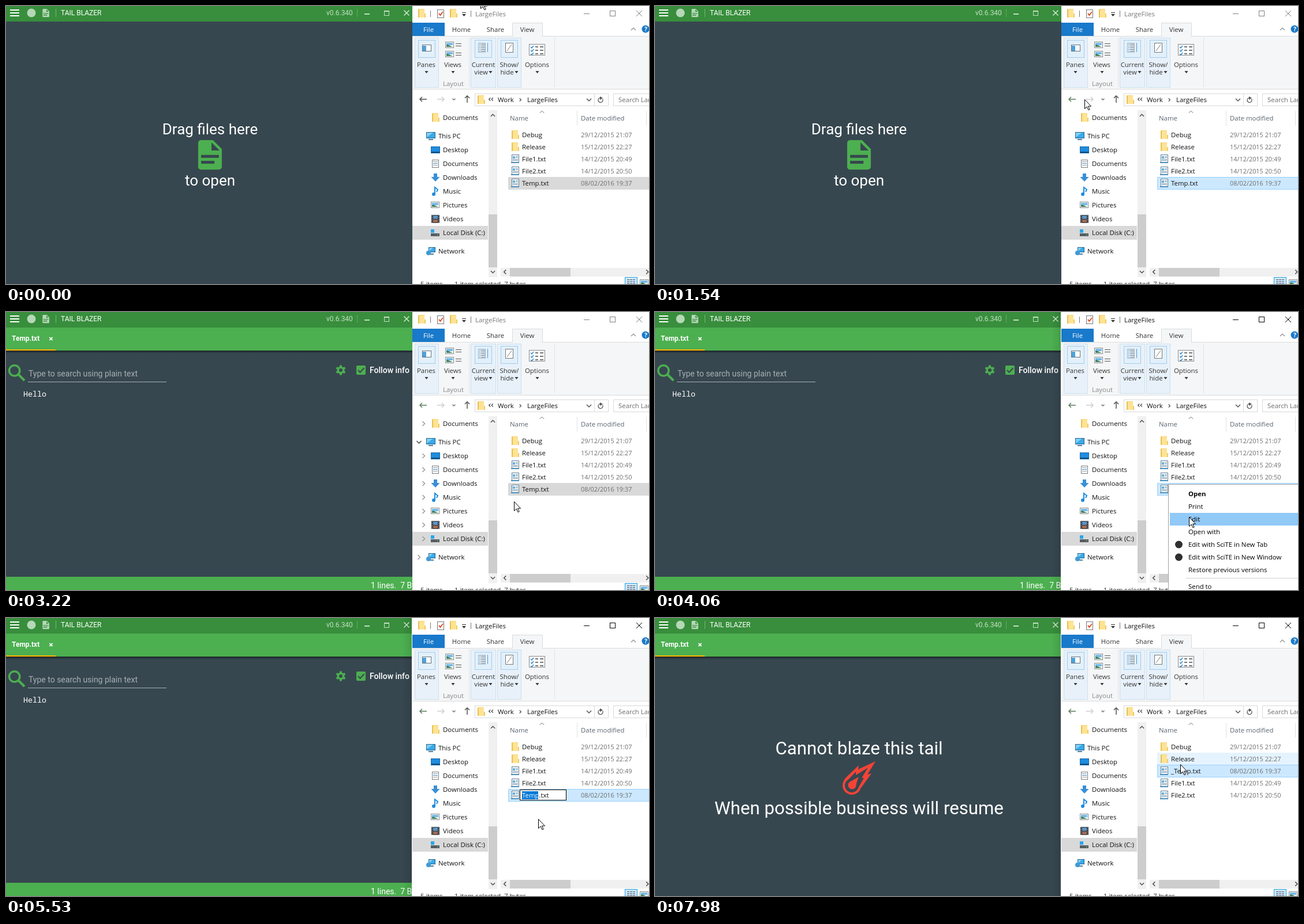
These frames come from a looping animation (1114 by 483 pixels, 8000 ms). An HTML page with a canvas:

```html
<!DOCTYPE html>
<html lang="en">
<head>
<meta charset="utf-8">
<title>Tail Blazer</title>
<style>
html, body { margin: 0; width: 100%; height: 100%; overflow: hidden; }
canvas { display: block; }
</style>
</head>
<body>
<canvas id="stage" width="1114" height="483"></canvas>
<script>
const g = document.getElementById('stage').getContext('2d');
const LOOP = 8000, STEP = 70;
const UI = '"Open Sans", "Noto Sans", sans-serif';
const APP = 'Roboto, sans-serif';
const GREEN = '#4caf50', SLATE = '#37474f';

const DOC = new Path2D('M13,9H18.5L13,3.5V9M6,2H14L20,8V20A2,2 0 0,1 18,22H6C4.89,22 4,21.1 4,20V4C4,2.89 4.89,2 6,2M15,18V16H6V18H15M18,14V12H6V14H18Z');
const ARROW = new Path2D('M.5,.5V16.5L4.2,13L7,18.8L9.2,17.8L6.5,12.2H11.5Z');

// Pointer way points: time, x, y
const WAY = [
  [0, 822, -12], [350, 822, -12], [1190, 931, 299], [1400, 850, 215],
  [1610, 700, 140], [1890, 521, 192], [2310, 521, 192], [2590, 392, 256],
  [2870, 596, 188], [3220, 880, 329], [3640, 890, 299], [3920, 890, 299],
  [4130, 940, 380], [4410, 960, 500], [5249, 960, 500], [5250, 1130, 405],
  [5670, 835, 325], [6090, 895, 299], [6440, 895, 299], [6650, 909, 253],
  [6720, 909, 253], [6790, 910, 254], [8000, 910, 254]
];

const ramp = (t, a, b) => Math.min(1, Math.max(0, (t - a) / (b - a)));

function pointer(t) {
  let i = 1;
  while (i < WAY.length - 1 && t > WAY[i][0]) i++;
  const [t0, x0, y0] = WAY[i - 1], [t1, x1, y1] = WAY[i];
  const k = ramp(t, t0, t1);
  const e = (k + k * k * (3 - 2 * k)) / 2;
  return { x: Math.round(x0 + (x1 - x0) * e), y: Math.round(y0 + (y1 - y0) * e) };
}

function rect(x, y, w, h, fill, stroke) {
  if (fill) { g.fillStyle = fill; g.fillRect(x, y, w, h); }
  if (stroke) {
    g.strokeStyle = stroke;
    g.lineWidth = 1;
    g.strokeRect(x + .5, y + .5, w - 1, h - 1);
  }
}

function line(color, width, ...p) {
  g.strokeStyle = color;
  g.lineWidth = width;
  g.beginPath();
  for (let i = 0; i < p.length; i += 2) g.lineTo(p[i], p[i + 1]);
  g.stroke();
}

function poly(color, ...p) {
  g.fillStyle = color;
  g.beginPath();
  for (let i = 0; i < p.length; i += 2) g.lineTo(p[i], p[i + 1]);
  g.fill();
}

function disc(x, y, r, color) {
  g.fillStyle = color;
  g.beginPath();
  g.arc(x, y, r, 0, 7);
  g.fill();
}

function text(s, x, y, color, font, align = 'left') {
  g.font = font;
  g.textAlign = align;
  g.fillStyle = color;
  g.fillText(s, x, y);
}

// Window text, placed by its vertical middle
function ui(s, x, mid, color = '#111', align = 'left', size = 11.4, weight = 400) {
  text(s, x, mid + 4, color, `${weight} ${size}px ${UI}`, align);
}

// Right-angled chevron pointing along (dx, dy)
function chevron(x, y, dx, dy, color = '#505050', width = 1.5) {
  line(color, width, x - dx - 2 * dy, y - dy - 2 * dx, x + dx, y + dy, x - dx + 2 * dy, y - dy + 2 * dx);
}

function cross(x, y, r, color, width = 1) {
  line(color, width, x - r, y - r, x + r, y + r);
  line(color, width, x + r, y - r, x - r, y + r);
}

function glyph(path, x, y, scale, color) {
  g.save();
  g.translate(x, y);
  g.scale(scale, scale);
  g.fillStyle = color;
  g.fill(path);
  g.restore();
}

function folder(x, y) {
  rect(x, y, 11, 14, '#f6d678');
  rect(x, y + 1, 2, 14, '#e9bf55');
  rect(x + 2, y + 1, 9, 14, '#fde394');
  rect(x + 11, y + 8, 2, 7, '#f0cc68');
}

function textFile(x, y) {
  rect(x + 1, y, 13, 15, '#fff', '#5d7f95');
  rect(x + 3, y + 3, 4, 4, '#62aedb');
  for (const dy of [3, 5]) rect(x + 8, y + dy, 4, 1, '#7b96a8');
  for (const dy of [8, 10]) rect(x + 3, y + dy, 9, 1, '#7b96a8');
  rect(x, y + 13, 14, 2, '#4b8fbd');
}

function page(x, y) {
  rect(x, y, 12, 14, '#fff', '#7d7d7d');
  for (let i = 3; i < 12; i += 3) rect(x + 2, y + i, 8, 1, i === 6 ? '#3a8cd0' : '#8a9aa5');
}

function picture(x, y) {
  rect(x, y, 15, 11, '#fff', '#888');
  rect(x + 2, y + 2, 11, 4, '#70b9e8');
  poly('#3f7e58', x + 2, y + 9, x + 2, y + 5, x + 6, y + 6, x + 13, y + 9);
}

function screen(x, y, w, h) {
  rect(x, y, w, h, '#39a9e8', '#23658f');
  poly('#7fd0f7', x + 1, y + 1, x + w - 4, y + 1, x + 1, y + h - 2);
}

function titleBar() {
  const pale = '#b5d8b7';
  rect(0, 0, 704, 27, '#388e3c');
  for (let y = 6; y < 18; y += 5) rect(7, y, 16, 2, '#fff');
  disc(44, 12, 7.5, pale);
  glyph(DOC, 60.5, 3.5, .72, pale);
  rect(86, 5, 1, 14, '#7ab47d');
  text('TAIL BLAZER', 95, 16, '#fff', '12px ' + APP);
  text('v0.6.340', 555, 16, '#c3dfc4', '12px ' + APP);
  rect(608, 5, 1, 14, '#63a766');
  rect(621, 13, 9, 2, '#c3dfc4');
  rect(655, 8, 9, 9, null, '#c3dfc4');
  rect(655, 8, 9, 2, '#c3dfc4');
  cross(694, 12, 4.5, '#d3e8d4', 1.5);
}

function tabStrip() {
  rect(0, 27, 704, 40, GREEN);
  rect(0, 65, 86, 2, '#ffb300');
  const shade = g.createLinearGradient(0, 67, 0, 72);
  shade.addColorStop(0, 'rgba(0,0,0,.5)');
  shade.addColorStop(1, 'rgba(0,0,0,0)');
  rect(0, 67, 704, 5, shade);
  text('Temp.txt', 10, 50, '#fff', '700 12px ' + APP);
  cross(78, 46.5, 2.6, '#fff', 1.6);
}

function gear(x, y) {
  g.save();
  g.translate(x, y);
  for (let i = 0; i < 6; i++) {
    rect(-2, -8.5, 4, 5, GREEN);
    g.rotate(Math.PI / 3);
  }
  disc(0, 0, 6.3, GREEN);
  disc(0, 0, 3, SLATE);
  g.restore();
}

function dropView() {
  const font = '26px ' + APP;
  text('Drag files here', 353.5, 223, '#fff', font, 'center');
  glyph(DOC, 322.7, 228, 2.56, GREEN);
  text('to open', 353.5, 312, '#fff', font, 'center');
}

function tailView() {
  g.strokeStyle = GREEN;
  g.lineWidth = 3.4;
  g.beginPath();
  g.arc(14.7, 101.8, 9.1, 0, 7);
  g.stroke();
  line(GREEN, 4, 21.5, 108.5, 32, 119);
  text('Type to search using plain text', 39, 112, '#a7b0b4', '14px ' + APP);
  rect(38, 121, 240, 1, '#a7b0b4');
  gear(580, 101);
  g.fillStyle = GREEN;
  g.beginPath();
  g.roundRect(607, 93, 16, 16, 2);
  g.fill();
  line(SLATE, 2, 610, 101, 613.5, 104.7, 620.5, 97.2);
  text('Follow info', 630, 106, '#fff', '500 14px ' + APP);
  text('Hello', 30, 147, '#fff', '13.33px "Noto Sans Mono", monospace');
  rect(0, 460, 704, 23, GREEN);
  text('1 lines.\u00a0 7 Bytes', 632, 480, '#fff', '14px ' + APP);
}

function lostView() {
  const font = '31.2px ' + APP, red = '#f44336';
  text('Cannot blaze this tail', 353.5, 237, '#fff', font, 'center');
  disc(341, 291, 16, red);
  poly(red, 326, 285, 330, 278, 353, 256, 352, 263, 382, 249, 368, 272, 375, 270, 357, 295);
  disc(341, 291, 12, SLATE);
  poly(SLATE, 330, 286, 348, 267, 348, 273, 369, 260, 358, 278, 362, 278, 351, 297);
  disc(341.5, 290.5, 7, red);
  poly(red, 337, 285, 353, 276, 347, 293);
  text('When possible business will resume', 353.5, 341, '#fff', font, 'center');
}

function app(t) {
  g.save();
  g.beginPath();
  g.rect(0, 0, 704, 483);
  g.clip();
  rect(0, 0, 704, 483, SLATE);
  titleBar();
  if (t < 2520) dropView();
  else {
    if (t < 7980) tailView(); else lostView();
    tabStrip();
  }
  g.restore();
}

function caption(active) {
  const ink = active ? '#000' : '#808080';
  folder(714, 5);
  rect(735, 8, 1, 11, '#777');
  rect(747, 6, 12, 15, '#fff', '#777');
  line('#d9532c', 2, 750, 13, 752.5, 16, 757, 10);
  folder(769, 5);
  rect(790, 11, 7, 1, '#333');
  poly('#333', 790, 14, 797, 14, 793.5, 18);
  rect(805, 8, 1, 11, '#777');
  ui('LargeFiles', 813, 14, active ? '#111' : '#757575');
  rect(1001, 13, 10, 1, ink);
  rect(1046, 8, 10, 10, null, ink);
  cross(1097, 13, 5, ink);
}

function ribbon() {
  rect(704, 52, 410, 93, '#f5f6f7');
  rect(704, 52, 410, 1, '#dadbdc');
  rect(704, 144, 410, 1, '#dadbdc');
  rect(704, 29, 56, 23, '#1979ca');
  rect(877, 29, 53, 24, '#f5f6f7');
  line('#dadbdc', 1, 877.5, 53, 877.5, 29.5, 929.5, 29.5, 929.5, 53);
  ui('File', 732, 41, '#fff', 'center');
  ui('Home', 789, 41, '#333', 'center');
  ui('Share', 848, 41, '#333', 'center');
  ui('View', 903, 41, '#333', 'center');
  chevron(1087, 40, 0, -2, '#8a8a8a', 1.2);
  disc(1108, 40, 6.5, '#1979ca');
  ui('?', 1108.5, 40, '#fff', 'center', 10.5, 700);

  for (const [x, w] of [[708, 42], [805, 44], [851, 42]]) {
    rect(x, 55, w, 87, '#e8f1f9', '#cbe0f1');
    rect(x + w / 2 - 15, 59, 30, 31, '#e2f0fb', '#a4cbea');
  }
  rect(802, 55, 1, 86, '#e2e3e4');
  rect(950, 55, 1, 86, '#e2e3e4');

  rect(721, 67, 16, 12, '#fff', '#68727a');
  rect(722, 69, 6, 9, '#4ba3dc');
  picture(761, 62);
  picture(761, 78);
  for (const y of [65, 69, 81, 85]) rect(779, y, 10, 1, '#555');
  for (let y = 66; y < 81; y += 3) {
    rect(820, y, 2, 1, '#4a9bd4');
    rect(823, y, 7, 1, '#777');
  }
  rect(818, 64, 13, 17, null, '#a4b6c3');
  line('#4a9bd4', 1, 834.5, 64, 834.5, 80);
  rect(865, 64, 14, 17, '#fff', '#777');
  line('#777', 1, 868, 78, 876, 67);
  rect(906, 66, 28, 20, '#fff', '#888');
  for (let y = 70; y < 84; y += 6) {
    line('#2a86cc', 1.4, 909, y + 1, 911, y + 3, 914, y - 1);
    rect(917, y, 5, 2, '#777');
    rect(925, y, 6, 2, '#777');
  }

  const label = (s, x, y = 102) => ui(s, x, y, '#333', 'center');
  const drop = (x, y = 115) => poly('#333', x - 3, y - 2, x + 3, y - 2, x, y + 2);
  label('Panes', 728); drop(728.5);
  label('Views', 774); drop(774.5);
  label('Current', 827); label('view', 823, 115); drop(839.5);
  label('Show/', 872); label('hide', 868, 115); drop(884.5);
  label('Options', 920); drop(920.5);
  ui('Layout', 775, 135, '#8a8a8a', 'center');
}

function arrow(x, y, dx, dy, color) {
  line(color, 1.5, x - dx * 6, y - dy * 6, x + dx * 6, y + dy * 6);
  line(color, 1.5, x + dx * 2 - dy * 4, y + dy * 2 - dx * 4, x + dx * 6, y + dy * 6,
    x + dx * 2 + dy * 4, y + dy * 2 + dx * 4);
}

function addressRow(t) {
  arrow(723, 162, -1, 0, t < 1260 ? '#4c4c4c' : '#5a7d58');
  arrow(753, 162, 1, 0, '#cfcfcf');
  chevron(776, 162, 0, 1.2, '#777');
  arrow(799, 162, 0, -1, '#505050');
  rect(812, 152, 232, 22, '#fff', '#d9d9d9');
  rect(1019, 152, 1, 22, '#d9d9d9');
  folder(817, 155);
  for (const x of [838, 842.5]) chevron(x, 162, -1.3, 0, '#333', 1.1);
  ui('Work', 852, 163);
  chevron(891, 163, 1.3, 0, '#444', 1.2);
  ui('LargeFiles', 903, 163);
  chevron(1010, 163, 0, 2, '#555');
  g.strokeStyle = '#555';
  g.lineWidth = 1.4;
  g.beginPath();
  g.arc(1030, 163.5, 4, -.5, 4.5);
  g.stroke();
  poly('#555', 1029, 157, 1034, 160, 1029, 163);
  rect(1052, 152, 80, 22, '#fff', '#d9d9d9');
  ui('Search LargeFiles', 1061, 163, '#6d6d6d');
}

const TREE = [
  ['Documents', 194, () => folder(738, 186)],
  ['This PC', 226, () => { screen(728, 219, 16, 11); rect(732, 231, 8, 2, '#4c7e9d'); }],
  ['Desktop', 250, () => { rect(736, 244, 16, 12, '#1e8de0', '#1769a8'); rect(737, 253, 14, 2, '#155080'); }],
  ['Documents', 274, () => page(738, 267)],
  ['Downloads', 298, () => poly('#3a8fd6', 741, 291, 747, 291, 747, 297, 751.5, 297, 744, 305, 736.5, 297, 741, 297)],
  ['Music', 322, () => {
    disc(741, 327, 3, '#1e8de0');
    line('#1e8de0', 2, 743, 327, 743, 315, 748, 319, 746, 323);
  }],
  ['Pictures', 346, () => picture(736, 340)],
  ['Videos', 370, () => {
    rect(737, 363, 14, 14, '#30343a');
    rect(740, 364, 8, 6, '#5a92c2');
    rect(740, 371, 8, 5, '#a06a50');
    for (let y = 364; y < 377; y += 3) { rect(738, y, 1, 1, '#fff'); rect(749, y, 1, 1, '#fff'); }
  }],
  ['Local Disk (C:)', 394, () => {
    rect(736, 388, 6, 6, '#28a8ea');
    rect(736, 395, 15, 5, '#555d63');
    rect(747, 397, 2, 1, '#6ce06c');
  }],
  ['Network', 426, () => {
    screen(732, 419, 12, 9);
    disc(732, 429, 4, '#3f9bd6');
    rect(735, 430, 6, 2, '#4c7e9d');
  }]
];

function tree(t) {
  const marks = ramp(t, 2870, 3150) - ramp(t, 3430, 3710) + ramp(t, 5530, 5740) - ramp(t, 6230, 6510);
  rect(704, 382, 131, 24, '#d9d9d9');
  for (const [name, y, icon] of TREE) {
    const root = name === 'This PC' || name === 'Network';
    icon();
    ui(name, root ? 749 : 757, y);
    g.globalAlpha = marks;
    if (name === 'This PC') chevron(715.5, y, 0, 2, '#444');
    else chevron(root ? 715.5 : 723.5, y, 2, 0, '#9a9a9a');
    g.globalAlpha = 1;
  }
  rect(836, 181, 15, 290, '#f0f0f0');
  rect(836, 362, 15, 92, '#cdcdcd');
  chevron(843.5, 190, 0, -1.8);
  chevron(843.5, 462, 0, 1.8);
}

function rowFill(i, fill, border) {
  rect(870, 213 + 21 * i, 250, 22, fill, border);
}

function files(t, p) {
  const done = t >= 7980;
  const temp = [done ? '_Temp.txt' : 'Temp.txt', '08/02/2016 19:37'];
  const rows = [['Debug', '29/12/2015 21:07'], ['Release', '15/12/2015 22:27'],
    ['File1.txt', '14/12/2015 20:49'], ['File2.txt', '14/12/2015 20:50']];
  const at = done ? 2 : 4;
  rows.splice(at, 0, temp);

  ui('Name', 873, 195, '#5a6470');
  ui('Date modified', 996, 195, '#5a6470');
  chevron(928.5, 184, 0, -1.8, '#666', 1);
  rect(989, 182, 1, 26, '#e2e2e2');
  rect(1109, 182, 1, 26, '#e2e2e2');

  const hot = t < 1260 || (t >= 2940 && t < 3780) || t >= 5320;
  const over = hot && p.x >= 870 ? Math.floor((p.y - 213) / 21) : -1;
  if (over >= 0 && over < 5 && over !== at) rowFill(over, '#e5f3ff');
  const lit = (t >= 1050 && t < 1890) || t >= 3500;
  rowFill(at, lit ? '#cce8ff' : '#d9d9d9', lit && '#99d1ff');

  rows.forEach(([name, date], i) => {
    const y = 224 + 21 * i;
    if (i < 2) folder(876, y - 8); else textFile(875, y - 8);
    ui(name, 894, y);
    ui(date, 996, y, '#6d6d6d', 'left', 10.9);
  });
  if (t >= 5180 && !done) rename(t);
}

function rename(t) {
  const typed = t >= 7350;
  rect(890, 298, typed ? 86 : 81, 19, '#fff', '#000');
  ui(typed ? '_Temp.txt' : 'Temp.txt', 894, 308);
  if (t < 6090) {
    rect(894, 301, 28, 14, '#0078d7');
    ui('Temp', 894, 308, '#fff');
  }
  const blink = (t >= 6370 && t < 6930) || (typed && t < 7840);
  if (blink) rect(typed ? 899 : 894, 300, 1, 15, '#000');
}

function bottom() {
  rect(857, 455, 257, 15, '#f0f0f0');
  rect(873, 455, 105, 15, '#cdcdcd');
  chevron(864.5, 462, -1.8, 0);
  chevron(1111, 462, 1.8, 0);
  ui('5 items', 718, 483, '#333');
  ui('1 item selected  7 bytes', 777, 483, '#333');
  rect(1072, 471, 22, 20, '#cce8ff', '#26a0da');
  for (let y = 475; y < 483; y += 3) {
    for (let x = 1076; x < 1090; x += 5) rect(x, y, 4, 1, '#555');
  }
  picture(1098, 475);
}

function menu(p) {
  rect(889, 299, 240, 200, '#fff', '#a0a0a0');
  const items = ['Open', 'Print', 'Edit', 'Open with', 'Edit with SciTE in New Tab',
    'Edit with SciTE in New Window', 'Restore previous versions'];
  const over = Math.floor((p.y - 305) / 22);
  if (over >= 0 && over < items.length) rect(892, 305 + over * 22, 222, 22, '#91c9f7');
  items.forEach((s, i) => ui(s, 924, 316 + 22 * i, '#000', 'left', 11.4, i ? 400 : 700));
  disc(907.5, 404, 6.5, '#303030');
  disc(907.5, 426, 6.5, '#303030');
  rect(920, 462, 194, 1, '#d0d0d0');
  ui('Send to', 924, 477, '#000');
}

function explorer(t, p) {
  const active = t >= 3850;
  if (active) {
    const shade = g.createLinearGradient(686, 0, 704, 0);
    shade.addColorStop(0, 'rgba(0,0,0,0)');
    shade.addColorStop(1, 'rgba(0,0,0,.1)');
    rect(686, 0, 18, 483, shade);
  }
  rect(active ? 703 : 704, 0, 411, 483, '#fff');
  caption(active);
  ribbon();
  addressRow(t);
  tree(t);
  files(t, p);
  bottom();
  if (t >= 3920 && t < 5180) menu(p);
}

function draw(now) {
  const t = Math.floor(now % LOOP / STEP) * STEP;
  const p = pointer(t);
  app(t);
  explorer(t, p);
  g.save();
  g.translate(p.x, p.y);
  g.fillStyle = '#fff';
  g.fill(ARROW);
  g.strokeStyle = '#000';
  g.lineWidth = 1;
  g.stroke(ARROW);
  g.restore();
}

let start;
function tick(now) {
  start ??= now;
  draw(now - start);
  requestAnimationFrame(tick);
}
draw(0);
requestAnimationFrame(tick);
</script>
</body>
</html>
```
